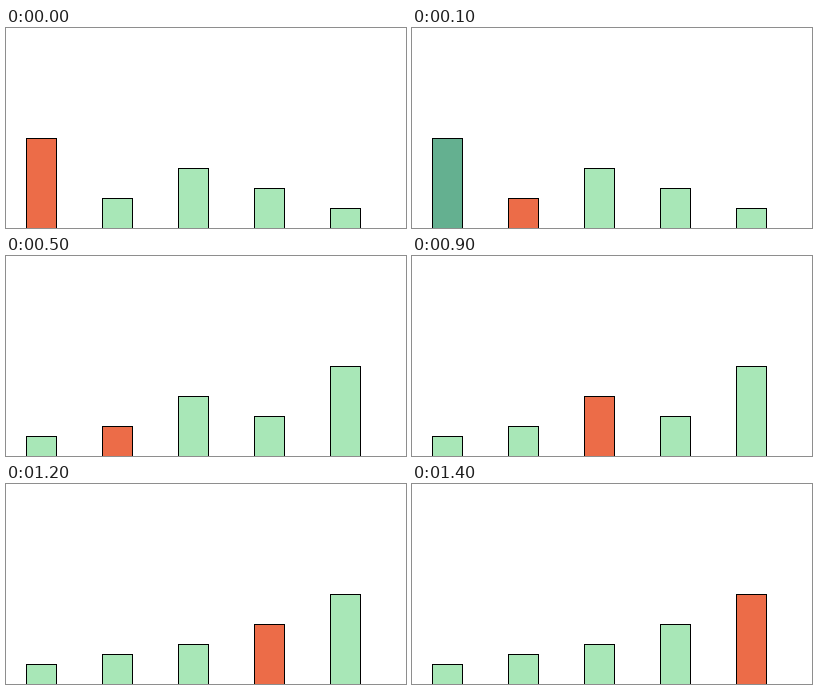
Write a matplotlib script that moves like this. It is 400 px wide and 200 px high and loops after 1.5 s.

```python
import matplotlib.pyplot as plt
from matplotlib.animation import FuncAnimation
from matplotlib.patches import Rectangle

WIDTH, HEIGHT, DPI = 400, 200, 100
STEP_MS = 100
BAR_WIDTH, SPACING, MARGIN, UNIT = 31, 76, 20, 10
IDLE, SLOT, SMALLEST = "#A8E7B7", "#64B090", "#EC6C48"
VALUES = [9, 3, 6, 4, 2]


def selection_sort(values):
    """Return (values, slot, smallest) for each comparison step."""
    values, steps = list(values), []
    for slot in range(len(values)):
        smallest = slot
        for probe in range(slot, len(values)):
            if values[probe] < values[smallest]:
                smallest = probe
            steps.append((values[:], slot, smallest))
        values[slot], values[smallest] = values[smallest], values[slot]
    return steps


def add_rect(x, width, color):
    return ax.add_patch(Rectangle((x, 0), width, 0, facecolor=color, linewidth=0))


fig = plt.figure(figsize=(WIDTH / DPI, HEIGHT / DPI), dpi=DPI, facecolor="white")
ax = fig.add_axes([0, 0, 1, 1])
ax.set(xlim=(0, WIDTH), ylim=(0, HEIGHT))
ax.axis("off")

lefts = [MARGIN + SPACING * i for i in range(len(VALUES))]
# A one-pixel outline: a fill inset into a black bar, open at the stage's bottom.
outlines = [add_rect(x, BAR_WIDTH, "black") for x in lefts]
fills = [add_rect(x + 1, BAR_WIDTH - 2, IDLE) for x in lefts]
steps = selection_sort(VALUES)


def draw(frame):
    values, slot, smallest = steps[frame]
    for i, value in enumerate(values):
        outlines[i].set_height(value * UNIT)
        fills[i].set_height(value * UNIT - 1)
        fills[i].set_facecolor(
            SMALLEST if i == smallest else SLOT if i == slot else IDLE
        )
    return outlines + fills


animation = FuncAnimation(
    fig, draw, frames=len(steps), interval=STEP_MS, repeat=True, repeat_delay=0
)
plt.show()
```
